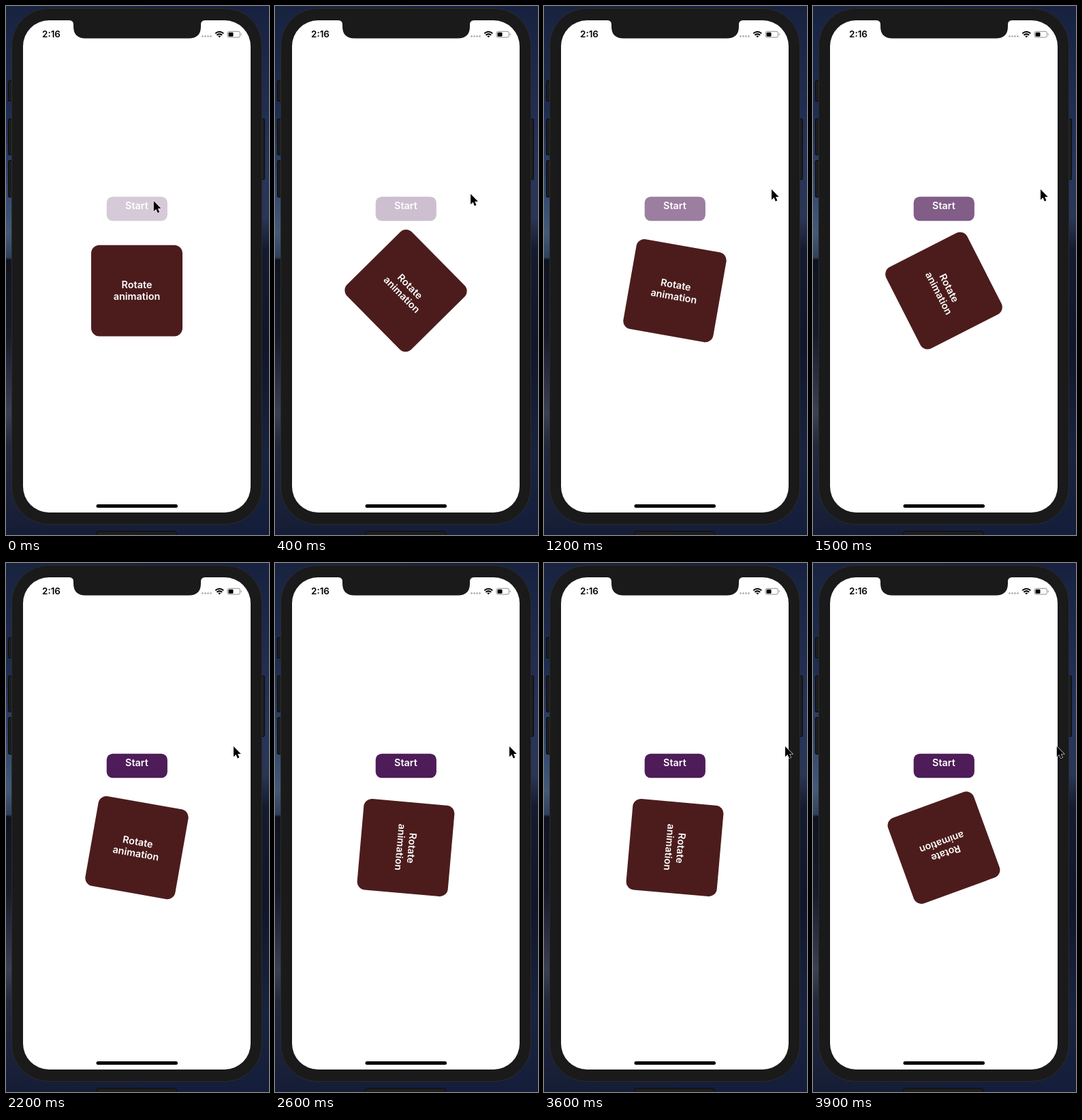
Write an HTML page that moves like this. It is 386 px wide and 776 px high and loops after 4 s.

```html
<!DOCTYPE html>
<html lang="en">
<head>
<meta charset="utf-8">
<title>Rotate animation</title>
<style>
  html, body { margin: 0; width: 100%; height: 100%; overflow: hidden; }
  svg { display: block; width: 386px; height: 776px; }
  text { font: 600 14.4px Inter, sans-serif; fill: #fff; text-anchor: middle; }
  #clock { font-size: 13.4px; fill: #000; }
</style>
</head>
<body>
<svg viewBox="0 0 386 776">
  <defs>
    <linearGradient id="left" x2="0" y2="1">
      <stop offset="0" stop-color="#18233f"/>
      <stop offset=".2" stop-color="#1f2d50"/>
      <stop offset=".34" stop-color="#32486c"/>
      <stop offset=".43" stop-color="#435a78"/>
      <stop offset=".475" stop-color="#30415c"/>
      <stop offset=".48" stop-color="#10131f"/>
      <stop offset=".62" stop-color="#171a29"/>
      <stop offset=".77" stop-color="#3c4054"/>
      <stop offset=".83" stop-color="#23283d"/>
      <stop offset="1" stop-color="#151d36"/>
    </linearGradient>
    <linearGradient id="right" x2="0" y2="1">
      <stop offset="0" stop-color="#17213f"/>
      <stop offset=".3" stop-color="#26345a"/>
      <stop offset=".4" stop-color="#2a3655"/>
      <stop offset=".46" stop-color="#151b2e"/>
      <stop offset=".65" stop-color="#10162a"/>
      <stop offset=".85" stop-color="#19233f"/>
      <stop offset="1" stop-color="#141e3b"/>
    </linearGradient>
  </defs>

  <rect width="193" height="776" fill="url(#left)"/>
  <rect x="193" width="193" height="776" fill="url(#right)"/>

  <g fill="#1d1d1f" stroke="#0b0c10">
    <rect x="3.5" y="109.5" width="8" height="30" rx="1.5"/>
    <rect x="3.5" y="165.5" width="8" height="53" rx="1.5"/>
    <rect x="3.5" y="226.5" width="8" height="54" rx="1.5"/>
    <rect x="371" y="165.5" width="8.5" height="89" rx="1.5"/>
    <rect x="132.5" y="770.5" width="118" height="20" rx="4"/>
  </g>
  <rect x="8.5" y="3.5" width="367" height="757" rx="54" fill="#1a1a1a" stroke="#2b2c30"/>
  <rect x="25" y="21" width="334" height="722" rx="38" fill="#fff"/>
  <path d="M93 20.5H292V21Q286 21.500 286 27V30Q286 47.500 268 47.500H117Q99 47.500 99 30V27Q99 21.500 93 21Z" fill="#1a1a1a"/>
  <rect x="132.500" y="731" width="119.500" height="5" rx="2.500"/>

  <text id="clock" x="66.500" y="46">2:16</text>
  <g fill="#b3b3b3">
    <circle cx="288.500" cy="44.500" r="1.400"/>
    <circle cx="292.500" cy="44.500" r="1.400"/>
    <circle cx="296.500" cy="44.500" r="1.400"/>
    <circle cx="300.500" cy="44.500" r="1.400"/>
  </g>
  <g fill="none" stroke="#000" stroke-width="2">
    <path d="M307.300 40.300Q313.300 35.300 319.300 40.300M309.400 42.800Q313.300 39.500 317.200 42.800"/>
    <path d="M313.300 46.300L311.200 44.300Q313.300 42.700 315.400 44.300Z" fill="#000" stroke="none"/>
  </g>
  <rect x="325" y="37.300" width="18.500" height="8.700" rx="2.500" fill="none" stroke="#8c8c8c"/>
  <rect x="326.500" y="38.700" width="7" height="6" rx="1.200"/>
  <path d="M345 40Q347 41.600 345 43.300Z" fill="#8c8c8c"/>

  <rect id="button" x="147.700" y="279.700" width="89.200" height="35.600" rx="9" fill="#4e1c58"/>
  <text x="192" y="298">Start</text>

  <g id="card">
    <rect x="-67" y="-66.800" width="134" height="133.600" rx="12" fill="#4c1c1c"/>
    <text y="-3.700">Rotate</text>
    <text y="13.300">animation</text>
  </g>

  <path id="cursor" d="M0 0V15.200L3.500 12L5.800 17.400L8.400 16.300L6.100 11H10.800Z" stroke="#fff" stroke-width="1.100" paint-order="stroke"/>
</svg>
<script>
  const LOOP = 4000, STEP = 100, TURN = 1000;

  // [time, value] pairs, linear in between
  const turn = [[0, 0], [100, 10], [400, 63], [500, 95], [700, 140], [800, 160], [1000, 180]];
  const fade = [[0, .23], [200, .23], [800, .37], [1500, .71], [2200, 1]];
  const cursorX = [[100, 216.8], [600, 334], [2400, 334], [2600, 344], [3000, 345.5],
                   [3200, 349.7], [3600, 354], [3900, 357.8]];
  const cursorY = [[100, 286], [600, 269]];

  function at(keys, t) {
    const i = keys.findIndex(([time]) => time > t);
    if (i < 0) return keys[keys.length - 1][1];
    if (i === 0) return keys[0][1];
    const [[t0, v0], [t1, v1]] = [keys[i - 1], keys[i]];
    return v0 + (v1 - v0) * (t - t0) / (t1 - t0);
  }

  const [button, card, cursor] = ['button', 'card', 'cursor'].map(id => document.getElementById(id));

  function draw(now) {
    const t = Math.floor(now % LOOP / STEP) * STEP;
    const angle = t < STEP ? 0 : at(turn, (t - STEP) % TURN);
    card.setAttribute('transform', `translate(192 417.6) rotate(${angle})`);
    button.setAttribute('fill-opacity', at(fade, t));
    cursor.setAttribute('transform', `translate(${at(cursorX, t)} ${at(cursorY, t)})`);
  }

  const start = performance.now();
  function tick() {
    draw(performance.now() - start);
    requestAnimationFrame(tick);
  }
  tick();
</script>
</body>
</html>
```
